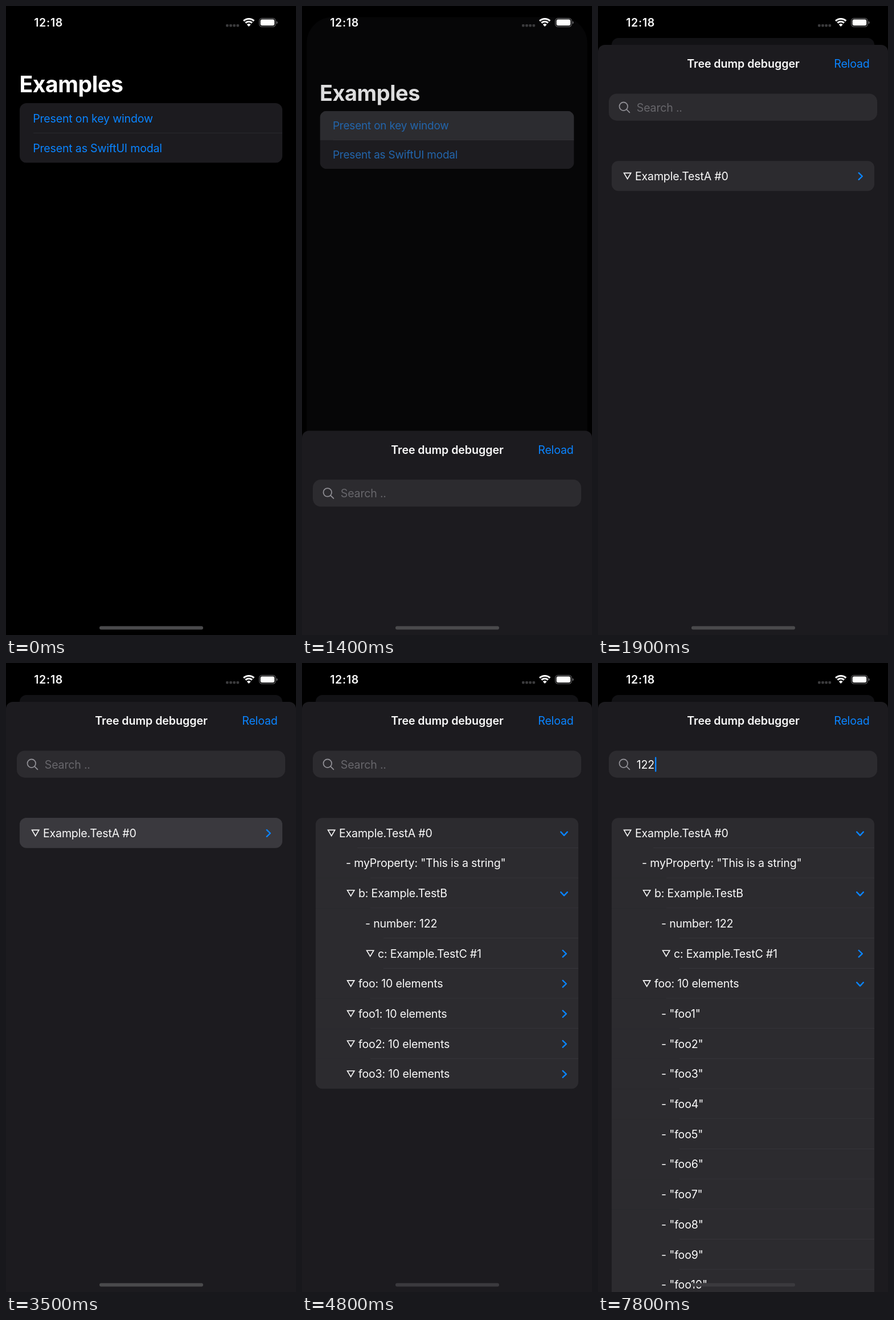
Write an HTML page that moves like this. It is 509 by 1101 pixels and loops after 8000 ms.

```html
<!DOCTYPE html>
<html lang="en">
<head>
<meta charset="utf-8">
<title>Tree dump debugger</title>
<style>
  html, body { margin: 0; width: 100%; height: 100%; overflow: hidden; background: #000; }
  svg { display: block; width: 100vw; height: 100vh; }
  text {
    font: 400 19.6px Inter, sans-serif;
    font-optical-sizing: none;
    letter-spacing: -.2px;
    fill: #fafafa;
    white-space: pre;
  }
  .semi { font-weight: 600; letter-spacing: -.05px; }
  .clock { letter-spacing: .65px; }
  .large { font-size: 39.2px; font-weight: 700; letter-spacing: -.45px; }
  .blue { fill: #0a84ff; }
  .line { fill: none; stroke-linecap: round; stroke-linejoin: round; }
  .tri { stroke: #fafafa; stroke-width: 1.6; stroke-linejoin: miter; }
  .chev { stroke: #0a84ff; stroke-width: 2.4; }
  .cell { fill: #2c2b2f; }
  .sep { fill: #38373c; }
  .hit { fill: #3a393e; }
</style>
</head>
<body>
<svg viewBox="0 0 509 1101">
  <defs>
    <clipPath id="menuClip"><rect x="24" y="170" width="461" height="104.6" rx="12"/></clipPath>
    <clipPath id="listClip"><rect id="listBox" x="24" y="203" width="461" height="53" rx="12"/></clipPath>
  </defs>
  <rect width="509" height="1101"/>

  <g id="page">
    <rect id="card" width="509" height="1101"/>
    <text id="heading" class="large" x="23.4" y="151.4">Examples</text>
    <g clip-path="url(#menuClip)">
      <rect id="menu" x="24" y="170" width="461" height="104.6"/>
      <rect x="48" y="221.8" width="437" height="1" fill="#2b2a2f"/>
      <rect id="menuHit" class="hit" x="24" y="170" width="461" height="52.8"/>
    </g>
    <text class="link" x="47.2" y="203.6">Present on key window</text>
    <text class="link" x="47.2" y="255.9">Present as SwiftUI modal</text>
  </g>

  <g id="sheet">
    <path d="M0 1101V12A12 12 0 0 1 12 0H497A12 12 0 0 1 509 12V1101Z" fill="#1c1b1f"/>
    <text class="semi" x="255" y="40" text-anchor="middle">Tree dump debugger</text>
    <text class="blue" x="476.5" y="40" text-anchor="end">Reload</text>
    <rect class="cell" x="19" y="85.5" width="471" height="47.2" rx="14"/>
    <g class="line" stroke="#8f8e94" stroke-width="1.8">
      <circle cx="44.8" cy="107.8" r="7.3"/>
      <path d="M50.2 113.2L55.4 118.4"/>
    </g>
    <text id="query" x="67.8" y="116.8"></text>
    <rect id="caret" class="blue" y="96.5" width="2.4" height="26" rx="1.2"/>
    <g id="list" clip-path="url(#listClip)"></g>
  </g>

  <text class="semi clock" x="49.2" y="36.2">12:18</text>
  <g fill="#3b3b3d">
    <rect x="386" y="32" width="4.6" height="4.4" rx="1.3"/>
    <rect x="392.2" y="32" width="4.6" height="4.4" rx="1.3"/>
    <rect x="398.3" y="32" width="4.6" height="4.4" rx="1.3"/>
    <rect x="404.5" y="32" width="4.6" height="4.4" rx="1.3"/>
  </g>
  <g fill="none" stroke="#fff" stroke-width="3.1">
    <path d="M417.1 26.1A13.3 13.3 0 0 1 435.3 26.1"/>
    <path d="M420.4 29.5A8.6 8.6 0 0 1 432 29.5"/>
    <path d="M426.2 36L422.8 32.4A5 5 0 0 1 429.6 32.4Z" fill="#fff" stroke="none"/>
  </g>
  <rect x="444.6" y="21.6" width="28.6" height="14.6" rx="4.6" fill="none" stroke="#6a6a6c" stroke-width="1.1"/>
  <rect x="446.6" y="23.6" width="24.6" height="10.6" rx="2.9" fill="#fff"/>
  <path d="M474.8 26.4Q476.6 27.2 476.6 28.9Q476.6 30.6 474.8 31.4Z" fill="#77777a"/>
  <rect id="home" x="164" y="1085.6" width="182" height="6" rx="3"/>
</svg>
<script>
const LOOP = 8000, TICK = 100, ROW = 52.7, LIST_TOP = 203.2;
const PRESENT = 1300, LOADED = 1900, FOCUS = 6900;
const TAPS = { root: 3500, b: 4400, foo: 5800 };
const KEYS = [[7800, '122'], [7600, '12'], [7400, '1']];

const $ = id => document.getElementById(id);
const clamp = v => Math.min(1, Math.max(0, v));
const easeInOut = u => (1 - Math.cos(Math.PI * clamp(u))) / 2;
const mix = (a, b, k) => `rgb(${a.map((v, i) => v + (b[i] - v) * k)})`;

function add(parent, tag, attrs, text = '') {
  const el = document.createElementNS('http://www.w3.org/2000/svg', tag);
  for (const key in attrs) el.setAttribute(key, attrs[key]);
  el.textContent = text;
  return parent.appendChild(el);
}

// Each row: depth, label, parent branch, own branch name (nodes only)
const leaf = (depth, label, parent) => ({ depth, label: '- ' + label, parent });
const node = (depth, label, parent, name) => ({ depth, label, parent, name, isNode: true });
const rows = [
  node(0, 'Example.TestA #0', null, 'root'),
  leaf(1, 'myProperty: "This is a string"', 'root'),
  node(1, 'b: Example.TestB', 'root', 'b'),
  leaf(2, 'number: 122', 'b'),
  node(2, 'c: Example.TestC #1', 'b'),
  node(1, 'foo: 10 elements', 'root', 'foo'),
  ...Array.from({ length: 10 }, (_, i) => leaf(2, `"foo${i + 1}"`, 'foo')),
  ...[1, 2, 3].map(i => node(1, `foo${i}: 10 elements`, 'root'))
];

function buildRow(row) {
  const x = 44 + 34 * row.depth, sepX = 97 + 23 * row.depth;
  const g = row.g = add($('list'), 'g', {});
  add(g, 'rect', { class: 'cell', x: 24, width: 461, height: ROW + .3 });
  row.sep = add(g, 'rect', { class: 'sep', x: sepX, y: ROW - .8, width: 485 - sepX, height: 1 });
  if (row.name) {
    row.hit = add(g, 'rect', { class: 'hit', x: 24, y: -.3, width: 461, height: ROW + .6 });
  }
  if (row.isNode) {
    add(g, 'path', { class: 'line tri', d: `M${x + 1.6} 21.2h12.2l-6.1 10.2z` });
    row.chev = add(g, 'path', { class: 'line chev', d: 'M-2.3 -5.8L3.8 0L-2.3 5.8' });
  }
  add(g, 'text', { x: row.isNode ? x + 21 : x - .9, y: 33.6 }, row.label);
}

// Inserted branches lie above the rows they push down
for (const parents of [[null, 'root'], ['b'], ['foo']]) {
  rows.filter(row => parents.includes(row.parent)).forEach(buildRow);
}

const growth = (name, t) => name ? easeInOut((t - TAPS[name] - 6) / 300) : 1;
const turn = (name, t) => name ? easeInOut((t - TAPS[name] - 25) / 350) : 0;
const flash = (start, t) => t < start ? 0 : clamp(1 - (t - start) / 200);

function drawPage(t) {
  const w = Math.max(0, t - PRESENT - 20) * .0153;
  const p = t >= LOADED ? 1 : 1 - (1 + w) * Math.exp(-w);
  const k = clamp(p / .76), scale = 1 - .094 * p;
  $('page').setAttribute('transform', `translate(${509 * .047 * p} ${56 * p}) scale(${scale})`);
  $('card').setAttribute('rx', (63 - 51 * p) / scale);
  $('card').style.fill = mix([0, 0, 0], [18, 18, 21], p);
  $('heading').style.fill = mix([255, 255, 255], [180, 180, 182], k);
  $('menu').style.fill = mix([28, 27, 31], [31, 30, 34], k);
  $('menuHit').style.opacity = t < PRESENT ? 0 : 1 - k;
  for (const link of document.querySelectorAll('.link')) {
    link.style.fill = mix([10, 132, 255], [66, 65, 70], k);
  }
  $('sheet').setAttribute('transform', `translate(0 ${1101 - 1033 * p})`);
}

function drawList(t) {
  const pushed = t > TAPS.foo;
  let y = LIST_TOP;
  $('list').style.display = t < LOADED ? 'none' : '';
  rows.forEach((row, i) => {
    const grow = growth(row.parent, t);
    const offscreen = pushed && i >= rows.length - 2;
    row.g.style.display = grow && !offscreen ? '' : 'none';
    row.g.style.opacity = grow;
    row.g.setAttribute('transform', `translate(0 ${y})`);
    if (row.hit) row.hit.style.opacity = flash(TAPS[row.name], t);
    if (row.chev) {
      row.chev.setAttribute('transform', `translate(460 26.8) rotate(${90 * turn(row.name, t)})`);
    }
    if (!offscreen) y += ROW * grow;
  });
  rows[0].sep.style.opacity = growth('root', t) ? 1 : 0;
  rows[rows.length - 1].sep.style.opacity = 0;
  $('listBox').setAttribute('height', y - LIST_TOP + (pushed ? 20 : 0));
}

function drawSearch(t) {
  const typed = (KEYS.find(([at]) => t >= at) || [0, ''])[1];
  const query = $('query');
  query.textContent = typed || 'Search ..';
  query.style.fill = typed ? '#fafafa' : '#67666b';
  $('caret').setAttribute('x', 68.7 + (typed ? query.getComputedTextLength() : 0));
  $('caret').style.opacity = clamp((t - FOCUS + TICK) / (2 * TICK));
}

function draw(t) {
  drawPage(t);
  drawList(t);
  drawSearch(t);
  $('home').style.fill = t > TAPS.root + 200 ? '#3b3a3e' : '#4a4a4c';
}

const start = performance.now();
function frame() {
  const t = (performance.now() - start) % LOOP;
  draw(Math.floor(t / TICK + .01) * TICK);
  requestAnimationFrame(frame);
}
frame();
</script>
</body>
</html>
```
